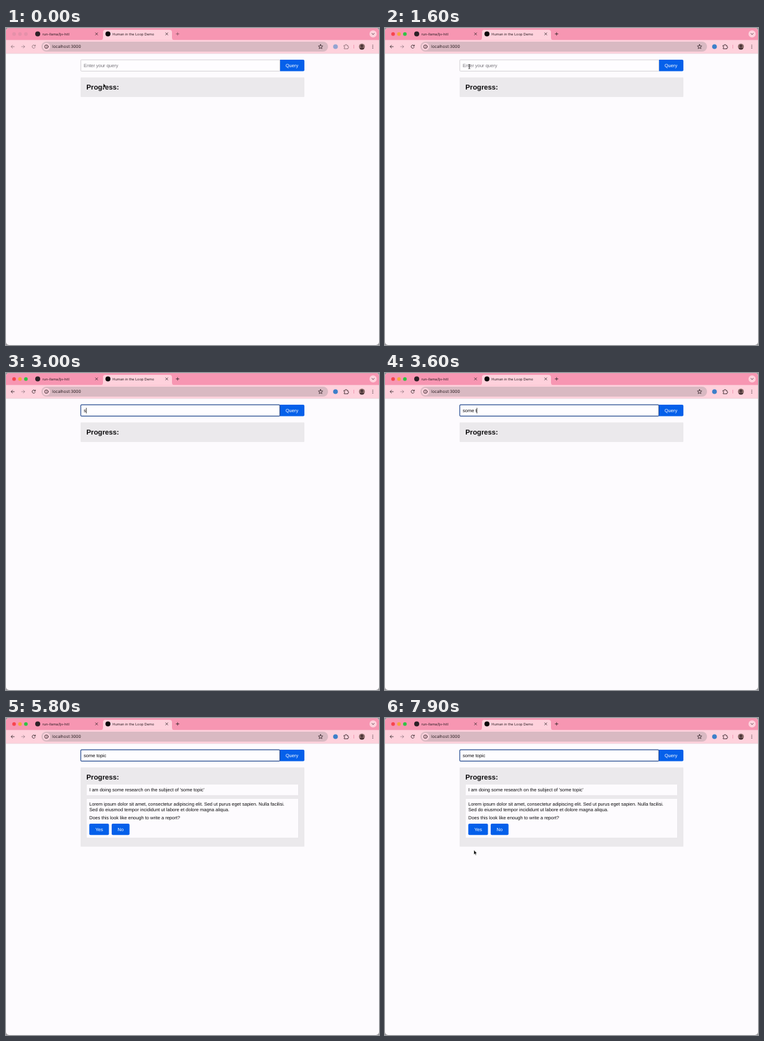
These frames come from a looping animation (600 by 510 pixels, 8000 ms). An HTML page:

```html
<!DOCTYPE html>
<html lang="en">
<head>
<meta charset="utf-8">
<title>Human in the Loop Demo</title>
<style>
  html, body { margin: 0; width: 100%; height: 100%; overflow: hidden; background: #98969a; }
  svg { display: block; width: 600px; height: 510px; }
  text { text-rendering: geometricPrecision; white-space: pre; }
  .page text { font: 7.5px "Liberation Sans", Arial, sans-serif; fill: #0c0b0d; }
  .page .title { font-size: 11.25px; font-weight: bold; }
  .page .light { fill: #fff; }
  .page .hint { fill: #757378; }
  .tab { font: 5.6px Inter, sans-serif; fill: #2b1d22; }
  .url { font: 6.55px Inter, sans-serif; fill: #2b1d22; }
  .icon { fill: none; stroke: #33242a; stroke-width: .85; stroke-linecap: round; stroke-linejoin: round; }
  .blue { fill: #0560ea; }
  .card { fill: #fdfbfe; stroke: #dddbdf; stroke-width: .5; }
  .idle .tools { opacity: .55; }
  .idle .lights { fill: #e590a9; }
  .idle .lights circle { fill: inherit; }
</style>
</head>
<body>
<svg viewBox="0 0 600 510">
  <defs>
    <clipPath id="window"><rect width="600" height="510" rx="5"/></clipPath>
    <clipPath id="face"><circle cx="572.5" cy="30" r="4.8"/></clipPath>
    <path id="close" d="M-1.7-1.7 1.7 1.7M1.7-1.7-1.7 1.7"/>
  </defs>
  <g clip-path="url(#window)">
    <rect width="600" height="510" fill="#fdfbfe"/>

    <g id="chrome">
      <rect width="600" height="20" fill="#f796b2"/>
      <rect width="600" height=".7" fill="#e3a3b5"/>
      <rect y="19.3" width="600" height="21.7" fill="#fed1dc"/>
      <rect y="40.7" width="600" height=".7" fill="#e3cdd4"/>
      <path d="M152 19.5q4 0 4-4V7q0-4 4-4H263q4 0 4 4v8.500q0 4 4 4z" fill="#fed1dc"/>

      <g class="lights">
        <circle cx="13" cy="9.700" r="2.9" fill="#f8444e"/>
        <circle cx="22.5" cy="9.700" r="2.9" fill="#f6a43c"/>
        <circle cx="32" cy="9.700" r="2.9" fill="#2fc344"/>
      </g>

      <circle cx="51" cy="9.500" r="4" fill="#2b2026"/>
      <text class="tab" x="58.500" y="11.500">run-llama/ljv-hitl</text>
      <circle cx="164" cy="9.500" r="4" fill="#08080a"/>
      <text class="tab" x="171.300" y="11.500">Human in the Loop Demo</text>
      <circle cx="590.500" cy="9.500" r="5.800" fill="#fed1dc"/>
      <g class="icon">
        <use href="#close" x="145.700" y="9.500"/>
        <use href="#close" x="258.600" y="9.500"/>
        <path d="M588.700 8.800l1.800 1.700 1.800-1.700"/>
      </g>

      <rect x="57" y="22" width="461" height="16" rx="8" fill="#d9b9c2"/>
      <circle cx="65" cy="30" r="6" fill="#fed1dc"/>
      <g class="icon">
        <circle cx="65" cy="30" r="2.900"/>
        <path d="M65 29.900v1.300M65 28.600v.1"/>
        <path d="M506 26.500l1 2.300 2.500.2-1.900 1.700.6 2.500-2.200-1.300-2.200 1.300.6-2.500-1.900-1.700 2.500-.2z"/>
      </g>
      <text class="url" x="74.300" y="32.300">localhost:3000</text>

      <g class="tools icon">
        <path d="M276 7.200v4.600M273.700 9.500h4.600"/>
        <path d="M13.300 30H8.300M10.500 27.700L8.200 30l2.300 2.300"/>
        <path d="M46.900 28.700A2.600 2.600 0 1 0 47 31M47.200 27.200v1.800h-1.800"/>
        <path d="M544 28h2v-.5a1 1 0 0 1 2 0V28h2v2h.3a1 1 0 0 1 0 2H550v1.500h-6v-1.800a1 1 0 0 0 0-2z"/>
      </g>
      <path class="icon" opacity=".45" d="M25 30h5M27.800 27.700l2.300 2.300-2.300 2.300"/>
      <circle class="tools" cx="530" cy="30" r="3.800" fill="#3d7fc9"/>
      <rect x="559" y="27" width=".8" height="6" fill="#f08da9"/>
      <g clip-path="url(#face)">
        <rect x="567" y="25" width="11" height="10" fill="#8a6a68"/>
        <circle cx="572.500" cy="28.800" r="2.200" fill="#4a3437"/>
        <ellipse cx="572.500" cy="34.800" rx="4" ry="3.400" fill="#4a3437"/>
      </g>
      <g fill="#33242a">
        <circle cx="590" cy="27.600" r=".65"/><circle cx="590" cy="30" r=".65"/><circle cx="590" cy="32.400" r=".65"/>
      </g>
    </g>

    <g class="page">
      <path class="blue" d="M440.500 51H478q2 0 2 2V67.500q0 2-2 2H440.500z"/>
      <text class="light" x="460" y="62.700" text-anchor="middle">Query</text>
      <rect id="field" x="120.300" y="51.200" width="320.200" height="18.200" fill="#fefdff"/>
      <text id="entry" x="125" y="62.700"></text>
      <rect id="caret" y="56" width=".8" height="9" fill="#111"/>

      <rect id="panel" x="120" y="79.500" width="360" height="31.500" rx="1" fill="#ebe9ec"/>
      <text class="title" x="129.300" y="99.300">Progress:</text>
      <g id="result">
        <rect class="card" x="129.300" y="106.500" width="341.200" height="18.300" rx="1"/>
        <text x="134" y="118.300">I am doing some research on the subject of 'some topic'</text>
        <rect class="card" x="129.300" y="129.500" width="341.200" height="63.500" rx="1"/>
        <text x="134" y="141.400">Lorem ipsum dolor sit amet, consectetur adipiscing elit. Sed ut purus eget sapien. Nulla facilisi.</text>
        <text x="134" y="150">Sed do eiusmod tempor incididunt ut labore et dolore magna aliqua.</text>
        <text x="134" y="163.400">Does this look like enough to write a report?</text>
        <rect class="blue" x="134" y="170" width="31.600" height="18.200" rx="2"/>
        <text class="light" x="149.800" y="181.800" text-anchor="middle">Yes</text>
        <rect class="blue" x="170" y="170" width="28.700" height="18.200" rx="2"/>
        <text class="light" x="184.350" y="181.800" text-anchor="middle">No</text>
      </g>
    </g>

    <path id="arrow" d="M0 0V7.300L1.700 5.800 2.800 8.200 4 7.700 2.900 5.300H5.100z" fill="#0a0a0a" stroke="#fff" stroke-width=".5"/>
    <path id="beam" d="M-1.500-3.500Q0-3.500 0-2.500Q0-3.500 1.500-3.500M0-2.500V2.500M-1.500 3.500Q0 3.500 0 2.500Q0 3.500 1.500 3.500M-.9.8H.9" fill="none" stroke="#222" stroke-width=".8"/>
  </g>
</svg>
<script>
const LOOP = 8000, ACTIVATE = 1500, FOCUS = 2050, TYPE = 3000, ANSWER = 5800, RETURN = 7100;
const $ = id => document.getElementById(id);
const show = (el, on) => el.setAttribute('visibility', on ? 'visible' : 'hidden');
const set = (el, attrs) => { for (const k in attrs) el.setAttribute(k, attrs[k]); };

const query = 'some topic';
const keyTimes = [3000, 3100, 3200, 3300, 3500, 3600, 3800, 4000, 4100, 4300];
const caretOff = [[0, FOCUS], [2600, TYPE], [4800, 5300], [ANSWER, 6300], [6800, 7300], [7800, LOOP]];

// Pointer path: time, x, y
const path = [
  [0, 156.5, 89], [400, 154, 160], [950, 147.6, 65.5], [1100, 147.6, 65.5],
  [1450, 136, 62], [1900, 134.5, 62.5], [2100, 133.8, 63], [7100, 133.8, 63],
  [7350, 128, 95], [7650, 134, 180], [7900, 143, 212.5], [8000, 143, 212.5]
];

function pointer(t) {
  const i = path.findIndex(p => p[0] > t);
  const [t0, x0, y0] = path[i - 1], [t1, x1, y1] = path[i];
  const u = (t - t0) / (t1 - t0), e = u * u * (3 - 2 * u);
  return [x0 + (x1 - x0) * e, y0 + (y1 - y0) * e];
}

function draw(t) {
  const focused = t >= FOCUS;
  const typed = query.slice(0, keyTimes.filter(k => k <= t).length);

  $('chrome').setAttribute('class', t < ACTIVATE ? 'idle' : '');
  set($('field'), focused
    ? { stroke: '#244a8f', 'stroke-width': 1.2, rx: 1.5 }
    : { stroke: '#c9c7cb', 'stroke-width': .8, rx: 1 });

  const entry = $('entry');
  entry.textContent = typed || 'Enter your query';
  entry.setAttribute('class', typed ? '' : 'hint');
  const width = typed ? entry.getComputedTextLength() : 0;
  $('caret').setAttribute('x', 125 + width);
  show($('caret'), !caretOff.some(([a, b]) => t >= a && t < b));

  show($('result'), t >= ANSWER);
  $('panel').setAttribute('height', t >= ANSWER ? 127.5 : 31.5);

  const [x, y] = pointer(t);
  const present = t < TYPE || t >= RETURN;
  const overField = t >= ACTIVATE && y < 70;
  for (const id of ['arrow', 'beam']) {
    $(id).setAttribute('transform', `translate(${x} ${y})`);
    show($(id), present && (id === 'beam') === overField);
  }
}

const start = performance.now();
function tick() {
  draw((performance.now() - start) % LOOP);
  requestAnimationFrame(tick);
}
tick();
</script>
</body>
</html>
```
